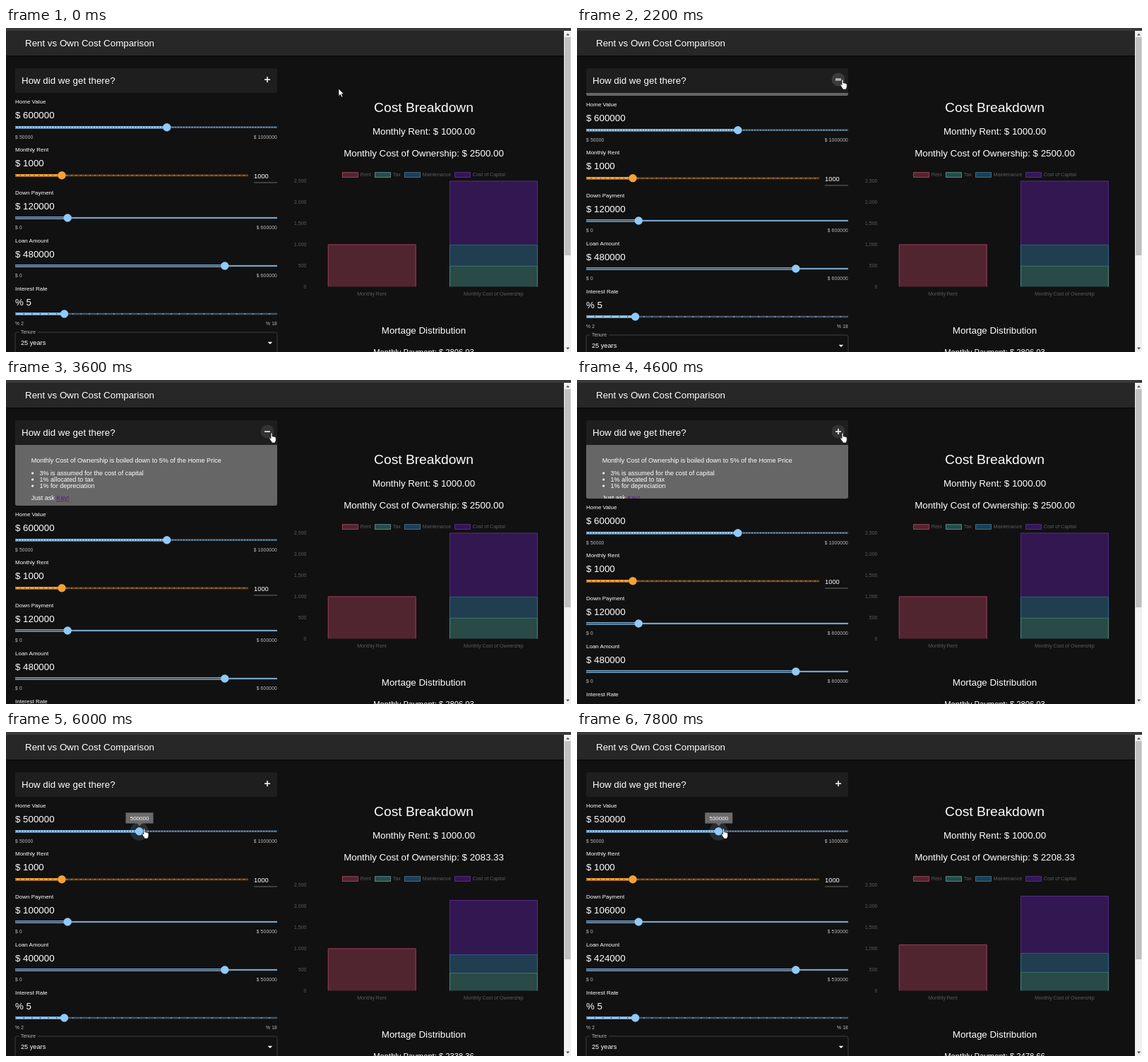
Recreate the animation shown at these times as an HTML page. Size 800 by 459 pixels, loop 8000 ms.

```html
<!DOCTYPE html>
<html lang="en">
<head>
<meta charset="utf-8">
<title>Rent vs Own Cost Comparison</title>
<style>
  html, body { margin: 0; width: 100%; height: 100%; overflow: hidden; background: #111; }
  svg { display: block; width: 100vw; height: 100vh; }
  text { font-family: "Liberation Sans", Arial, sans-serif; fill: #fff; white-space: pre; }
</style>
</head>
<body>
<svg id="stage" viewBox="0 0 800 459"></svg>
<script>
const NS = 'http://www.w3.org/2000/svg';
const LOOP = 8000, STEP = 200;
const BLUE = '#90caf9', ORANGE = '#f5a136', GREY = '#5c5c5c';
const LEFT = 13, RIGHT = 384;
const BASE = 366.5, PLOT = 150;
const PANEL = 86, OPEN = 2163, CLOSE = 4543;

const stage = document.getElementById('stage');

function add(parent, tag, attrs = {}) {
  const el = document.createElementNS(NS, tag);
  set(el, attrs);
  parent.appendChild(el);
  return el;
}
function set(el, attrs) {
  for (const key in attrs) el.setAttribute(key, attrs[key]);
}
function rect(parent, x, y, width, height, fill, more = {}) {
  return add(parent, 'rect', { x, y, width, height, fill, ...more });
}
function label(parent, x, y, size, str, more = {}) {
  const el = add(parent, 'text', { x, y, 'font-size': size, ...more });
  el.textContent = str;
  return el;
}
const middle = { 'text-anchor': 'middle' };
const end = { 'text-anchor': 'end' };

// ---- timing helpers ----
function track(keys, t, i = 1) {
  if (t <= keys[0][0]) return keys[0][i];
  for (let k = 1; k < keys.length; k++) {
    const a = keys[k - 1], b = keys[k];
    if (t <= b[0]) return a[i] + (b[i] - a[i]) * (t - a[0]) / (b[0] - a[0]);
  }
  return keys[keys.length - 1][i];
}

// cubic-bezier(.4, 0, .2, 1)
function ease(p) {
  if (p <= 0) return 0;
  if (p >= 1) return 1;
  let lo = 0, hi = 1, s = 0.5;
  for (let i = 0; i < 20; i++) {
    s = (lo + hi) / 2;
    const x = 1.2 * s * (1 - s) * (1 - s) + 0.6 * s * s * (1 - s) + s * s * s;
    if (x < p) lo = s; else hi = s;
  }
  return s * s * (3 - 2 * s);
}

const valueKeys = [[5400, 600], [6000, 500], [6400, 440], [6600, 390], [6800, 350],
  [7000, 350], [7400, 400], [7600, 440], [7800, 530]];
const cursorKeys = [[0, 471, 86], [400, 469, 86], [1600, 375, 73], [2400, 375, 73], [3600, 375, 75],
  [4600, 375, 75], [5000, 259, 123], [5200, 236, 137], [5400, 234, 137]];

const homeValue = t => Math.round(track(valueKeys, t) / 10) * 10000;
const panelHeight = t => Math.round(PANEL * (ease((t - OPEN) / 300) - ease((t - CLOSE) / 300)));
const homeX = v => LEFT + (v - 50000) / 950000 * (RIGHT - LEFT);

function axis(v) {
  const total = v * 0.05 / 12;
  const step = total > 2000 ? 500 : 200;
  return { step, max: Math.ceil(total / step) * step };
}
function targets(v) {
  const k = PLOT / axis(v).max, part = v * 0.01 / 12;
  return [1000 * k, part * k, part * 2 * k, part * 5 * k];
}
// Bars chase their new heights on every update.
function barHeights(t) {
  let h = targets(600000);
  for (let s = 5400; s <= t; s += STEP) {
    const goal = targets(homeValue(s));
    h = h.map((x, i) => x + (goal[i] - x) * 0.7);
  }
  return h;
}
function payment(loan) {
  const r = 0.05 / 12;
  return loan * r / (1 - Math.pow(1 + r, -300));
}

// ---- page frame ----
rect(stage, 0, 0, 800, 459, '#111');
rect(stage, 0, 39, 790, 2, '#0c0c0c');
rect(stage, 0, 4, 790, 35, '#272727');
rect(stage, 0, 0, 800, 4, '#3a3a3b');
label(stage, 27, 26, 13.33, 'Rent vs Own Cost Comparison');

rect(stage, 790, 4, 10, 455, '#f1f1f1');
rect(stage, 791, 13, 8.5, 309, '#c1c1c1');
add(stage, 'path', { d: 'M793 10.5h5l-2.5 -3zM793 452.5h5l-2.5 3z', fill: '#505050' });

// ---- accordion ----
const clip = add(add(stage, 'defs'), 'clipPath', { id: 'fold' });
const fold = rect(clip, LEFT, 57, 371, 35, '#fff', { rx: 2.7 });
const panel = add(stage, 'g', { 'clip-path': 'url(#fold)' });
rect(panel, LEFT, 92, 371, PANEL, '#666');
rect(panel, LEFT, 57, 371, 35, '#1e1e1e');
label(panel, 22, 79, 13.33, 'How did we get there?');
label(panel, 35.7, 117.3, 9.05, 'Monthly Cost of Ownership is boiled down to 5% of the Home Price');
['3% is assumed for the cost of capital', '1% allocated to tax', '1% for depreciation'].forEach((str, i) => {
  const y = 135 + i * 9;
  add(panel, 'circle', { cx: 37.6, cy: y - 3, r: 1.6, fill: '#fff' });
  label(panel, 47.5, y, 9.05, str);
});
label(panel, 35.7, 170.3, 9.05, 'Just ask ');
label(panel, 71.2, 170.3, 9.05, 'Kay!', { style: 'fill:#551a8b;text-decoration:underline' });

const halo = add(stage, 'circle', { cx: 370, cy: 73, r: 9.5, fill: '#343434' });
const bar = rect(stage, 366, 72.3, 8, 1.5, '#fff');
const post = rect(stage, 369.25, 69, 1.5, 8, '#fff');

// ---- form ----
const form = add(stage, 'g');

function slider(o) {
  const g = add(form, 'g');
  const y = o.y, x2 = o.right || RIGHT, color = o.color || BLUE;
  label(g, LEFT, y - 33.5, 8, o.name);
  const value = label(g, LEFT, y - 12.5, 13.33, o.value);
  let max;
  if (o.min) {
    const small = { 'letter-spacing': 0.2, style: 'fill:#bdbdbd' };
    label(g, LEFT, y + 16.3, 6.67, o.min, small);
    max = label(g, RIGHT, y + 16.3, 6.67, o.max, { ...small, ...end });
  }
  const marks = o.marks
    ? { 'stroke-dasharray': `1.33 ${(x2 - LEFT) / o.marks - 1.33}` } : {};
  const line = (to, stroke, width, more) => add(g, 'line',
    { x1: LEFT, x2: to, y1: y, y2: y, stroke, 'stroke-width': width, ...more });
  line(x2, color, 2.7, { opacity: 0.38 });
  line(x2, color, 1.33, { opacity: 0.9, ...marks });
  const fill = line(x2, color, 3.6);
  const dark = line(x2, '#1e1e1e', 1.33, { opacity: 0.8, ...marks });
  const glow = add(g, 'circle', { cy: y, r: 13, fill: color, opacity: 0 });
  const thumb = add(g, 'circle', { cy: y, r: 5.7, fill: color });
  function move(x) {
    set(fill, { x2: x });
    set(dark, { x2: x });
    set(glow, { cx: x });
    set(thumb, { cx: x });
  }
  move(LEFT + (x2 - LEFT) * o.at);
  return { value, max, glow, move };
}

const home = slider({ y: 140.7, name: 'Home Value', value: '$ 600000', min: '$ 50000', max: '$ 1000000', marks: 95, at: 0.579 });
slider({ y: 208.8, name: 'Monthly Rent', value: '$ 1000', color: ORANGE, right: 343, marks: 50, at: 0.2 });
const down = slider({ y: 269, name: 'Down Payment', value: '', min: '$ 0', max: '$ 600000', at: 0.2 });
const loan = slider({ y: 337, name: 'Loan Amount', value: '', min: '$ 0', max: '$ 600000', at: 0.8 });
slider({ y: 405, name: 'Interest Rate', value: '% 5', min: '% 2', max: '% 18', marks: 32, at: 0.1875 });

label(form, 351, 213.3, 9.33, '1000');
rect(form, 351, 218.6, 33, 0.8, '#7c857a');

add(form, 'path', { d: 'M18 431h-2.3q-2.7 0 -2.7 2.7v40h371v-40q0 -2.7 -2.7 -2.7H45', fill: 'none', stroke: '#4b4b4b', 'stroke-width': 0.8 });
label(form, 21, 433, 6.67, 'Tenure', { 'letter-spacing': 0.1, style: 'fill:#bdbdbd' });
label(form, 21, 449.3, 9.2, '25 years');
add(form, 'path', { d: 'M370.6 444.8h6.6l-3.3 3.3z', fill: '#fff' });

const tip = add(form, 'g');
add(tip, 'path', { d: 'M-19.5 114.2h39v15.3h-16l-3.5 3.7l-3.5 -3.7h-16z', fill: '#6b6b6b' });
const tipText = label(tip, 0, 124.6, 8, '', middle);

// ---- chart ----
const MID = 591.5;
label(stage, MID, 119.2, 19.2, 'Cost Breakdown', middle);
label(stage, MID, 150.8, 13.33, 'Monthly Rent: $ 1000.00', middle);
const ownText = label(stage, MID, 181.8, 13.33, '', middle);

const series = [
  { name: 'Rent', x: 476, fill: '#512530', line: '#a8455c' },
  { name: 'Tax', x: 522, fill: '#294a47', line: '#4a9a92' },
  { name: 'Maintenance', x: 564, fill: '#213d50', line: '#35789f' },
  { name: 'Cost of Capital', x: 635, fill: '#331750', line: '#5f2c93' }
];
const grey = { style: 'fill:' + GREY };
series.forEach(s => {
  rect(stage, s.x + 0.4, 204.7, 22, 6.8, s.fill, { stroke: s.line, 'stroke-width': 0.9 });
  label(stage, s.x + 25.8, 210.4, 7.05, s.name, grey);
});
const ticks = Array.from({ length: 11 }, () => label(stage, 425.5, 0, 7.05, '', { ...grey, ...end }));
const bars = series.map(s => add(stage, 'path', { fill: s.fill, stroke: s.line, 'stroke-width': 0.9 }));
label(stage, 518, 379, 7.05, 'Monthly Rent', { ...grey, ...middle });
label(stage, 690.3, 379, 7.05, 'Monthly Cost of Ownership', { ...grey, ...middle });

label(stage, MID, 433, 13.33, 'Mortage Distribution', middle);
const payText = label(stage, MID, 462.5, 11.2, '', middle);

// ---- pointer ----
const arrow = add(stage, 'path', {
  d: 'M0 0v10.4l2.4 -2.2l1.7 3.8l1.7 -0.8l-1.7 -3.7h3.2z',
  fill: '#fff', stroke: '#000', 'stroke-width': 0.6
});
const hand = add(stage, 'path', {
  d: 'M0 1q0 -1.2 1 -1.2t1 1.2v4q1.2 -0.8 1.9 0.3q1.2 -0.5 1.8 0.5q1.5 -0.3 1.5 1.3v3q0 1.4 -1 2.6v1.3h-5v-1.2q-1.8 -2 -3.3 -5q-0.3 -1.2 0.7 -1.2q0.8 0.2 1.4 1.3z',
  fill: '#fff', stroke: '#000', 'stroke-width': 0.6
});

const show = (el, on) => set(el, { visibility: on ? 'visible' : 'hidden' });

function draw(ms) {
  const t = Math.floor((ms % LOOP) / STEP) * STEP;
  const v = homeValue(t), h = panelHeight(t), x = homeX(v);

  // accordion
  set(fold, { height: 35 + h });
  set(form, { transform: `translate(0 ${h})` });
  const over = t >= 1600 && t < 4800;
  const open = t >= OPEN && t < CLOSE;
  const ripple = open && t < OPEN + STEP;
  show(halo, over);
  set(halo, { fill: ripple ? '#3b3b3b' : '#333' });
  set(bar, ripple ? { y: 71.3, height: 3.4, fill: '#b4b4b4' } : { y: 72.3, height: 1.5, fill: '#fff' });
  show(post, !open);

  // form values
  const drag = t >= 5200;
  home.move(x);
  home.value.textContent = '$ ' + v;
  down.value.textContent = '$ ' + Math.round(v * 0.2);
  loan.value.textContent = '$ ' + Math.round(v * 0.8);
  down.max.textContent = loan.max.textContent = '$ ' + v;
  set(home.glow, { opacity: drag ? 0.16 : 0 });
  show(tip, drag);
  set(tip, { transform: `translate(${x + 0.3} 0)` });
  tipText.textContent = v;

  // chart
  ownText.textContent = 'Monthly Cost of Ownership: $ ' + (v * 0.05 / 12).toFixed(2);
  payText.textContent = 'Monthly Payment: $ ' + payment(v * 0.8).toFixed(2);
  const { step, max } = axis(v);
  ticks.forEach((el, i) => {
    const n = i * step;
    show(el, n <= max);
    set(el, { y: BASE - n / max * PLOT + 2.5 });
    el.textContent = n.toLocaleString('en-US');
  });
  const tops = barHeights(t);
  bars.forEach((el, i) => {
    const left = i ? 628.4 : 456.2;
    const low = BASE - (i > 1 ? tops[i - 1] : 0);
    set(el, { d: `M${left} ${low}V${BASE - tops[i] + 0.4}h124v${low - BASE + tops[i] - 0.4}` });
  });

  // pointer
  const dragging = t > 5400;
  const px = dragging ? x + 6 : track(cursorKeys, t, 1);
  const py = dragging ? 137 : track(cursorKeys, t, 2);
  const pointing = over || drag;
  show(arrow, !pointing);
  show(hand, pointing);
  set(pointing ? hand : arrow, { transform: `translate(${px} ${py})` });
}

const start = performance.now();
function tick() {
  draw(performance.now() - start);
  requestAnimationFrame(tick);
}
draw(0);
requestAnimationFrame(tick);
</script>
</body>
</html>
```
